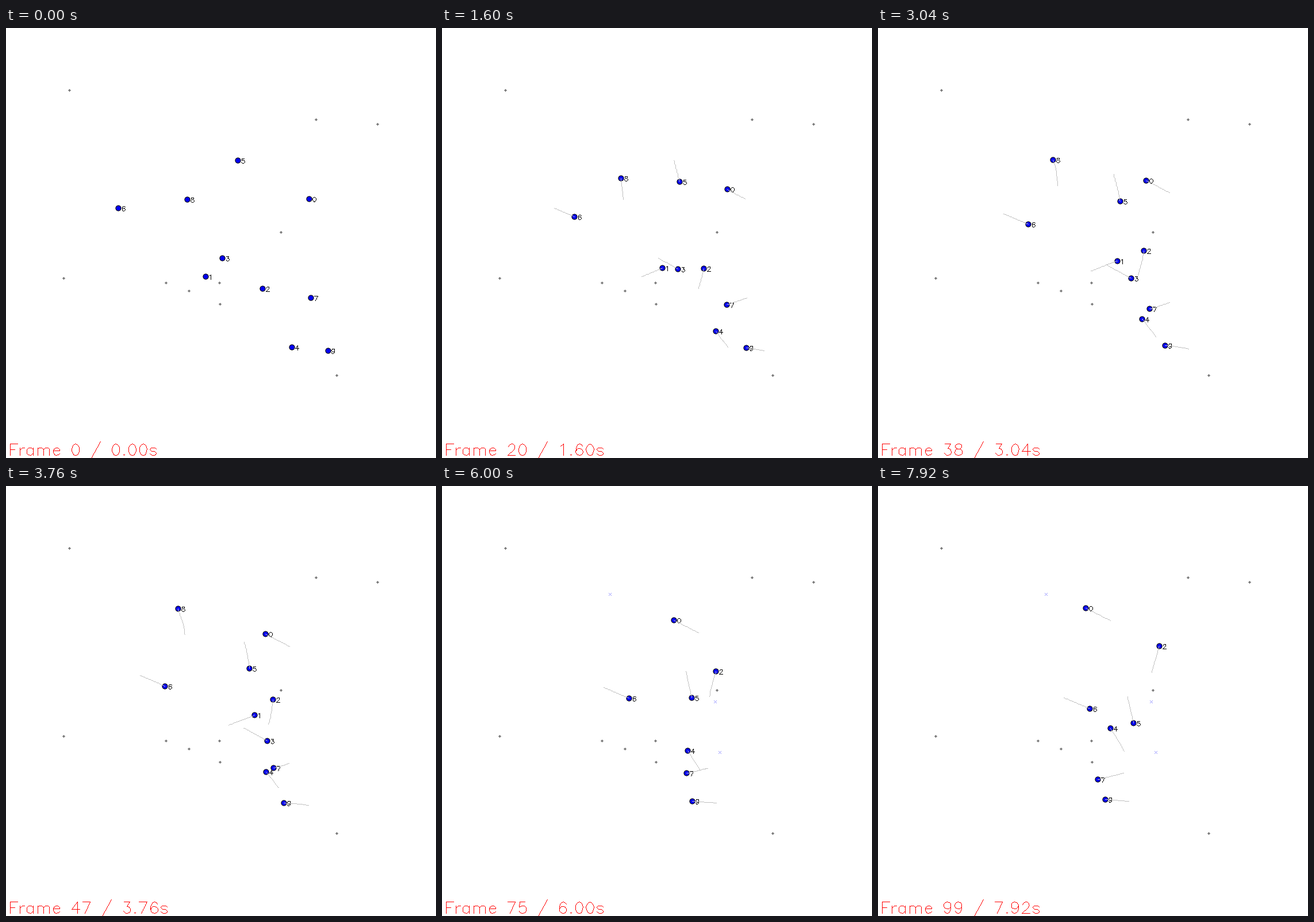
Recreate the animation shown at these times as a matplotlib script. Size 748 by 748 pixels, loop 8 s.

```python
from itertools import pairwise

import numpy as np
import matplotlib.pyplot as plt
from matplotlib.animation import FuncAnimation
from matplotlib.collections import PolyCollection
from matplotlib.patches import Circle

SIZE, DPI = 748, 100
FRAMES, INTERVAL = 100, 80
TRAIL = 25
SPEED, REACH = 1.85, 2.5

OBSTACLES = [(110, 108), (539, 159), (646, 167), (478, 355), (100, 435),
             (278, 443), (371, 443), (318, 457), (372, 480), (575, 604)]

# Each agent walks straight between its positions at these frames
KEYS = (0, 30, 58, 99)
PATHS = [
    [(527, 297), (480, 272), (432, 248), (361, 212)],
    [(347, 432), (401, 410), (452, 391)],
    [(446, 453), (460, 400), (467, 353), (489, 278)],
    [(376, 400), (427, 428), (471, 452)],
    [(497, 555), (465, 513), (444, 487), (404, 421)],
    [(403, 230), (418, 286), (427, 337), (444, 412)],
    [(195, 313), (247, 335), (295, 356), (368, 387)],
    [(530, 469), (478, 487), (456, 492), (382, 510)],
    [(315, 298), (309, 243), (292, 194)],
    [(560, 561), (513, 553), (463, 550), (395, 545)],
]
GOALS = {1: (475, 375), 3: (483, 463), 8: (292, 188)}


def walk(agent):
    """Pixel position at every frame, and the frame at which the agent vanishes."""
    points, times, end = PATHS[agent], KEYS, FRAMES
    if agent in GOALS:
        left = np.hypot(*np.subtract(GOALS[agent], points[-1]))
        points = points + [GOALS[agent]]
        times = KEYS[:3] + (KEYS[2] + left / SPEED,)
        end = round(KEYS[2] + (left - REACH) / SPEED)
    frames = np.arange(FRAMES)
    x, y = (np.interp(frames, times, axis) for axis in zip(*points))
    return np.rint(np.column_stack([x, y])).astype(int), end


def arc(cx, cy, rx, ry, start, end):
    a = np.radians(np.linspace(start, end, max(4, int(abs(end - start) / 20))))
    return list(zip(cx + rx * np.cos(a), cy + ry * np.sin(a)))


# Single-stroke glyphs: advance width and strokes, baseline at 0, capitals 21 high
SIX = arc(11, 10, 7, 11, 40, 170) + arc(10.5, 6.5, 6.5, 6.5, 180, 540)
GLYPHS = {
    "0": (20, [arc(10, 10.5, 7, 10.5, 90, 450)]),
    "1": (20, [[(6, 17), (8, 18), (11, 21), (11, 0)]]),
    "2": (20, [arc(10, 15, 6, 6, 170, -25) + [(13, 10), (3, 0), (17, 0)]]),
    "3": (20, [[(5, 21), (16, 21), (10, 13)] + arc(10.3, 6.5, 6.7, 6.5, 80, -158)]),
    "4": (20, [[(13, 0), (13, 21), (3, 7), (18, 7)]]),
    "5": (20, [[(15, 21), (5, 21), (4, 12)] + arc(10, 7, 7, 7, 120, -155)]),
    "6": (20, [SIX]),
    "7": (20, [[(3, 21), (17, 21), (7, 0)]]),
    "8": (20, [arc(10, 16.5, 6, 4.5, 90, 450), arc(10, 6, 7, 6, 90, 450)]),
    "9": (20, [[(20 - x, 21 - y) for x, y in SIX]]),
    "F": (18, [[(17, 21), (4, 21), (4, 0)], [(4, 11), (12, 11)]]),
    "r": (13, [[(4, 14), (4, 0)], arc(11, 8, 7, 6, 180, 80)]),
    "a": (19, [[(15, 14), (15, 0)], [(15, 11)] + arc(9.3, 7, 6.3, 7, 50, 310) + [(15, 3)]]),
    "m": (30, [[(4, 14), (4, 0)], arc(9.5, 10, 5.5, 4, 180, 0) + [(15, 0)],
               arc(20.5, 10, 5.5, 4, 180, 0) + [(26, 0)]]),
    "e": (18, [[(3, 8), (15, 8)] + arc(9, 7, 6, 7, 8, 320) + [(15, 3)]]),
    "s": (17, [arc(8.5, 10.7, 5.5, 3.3, 10, 255) + arc(8.5, 3.6, 5.5, 3.6, 75, -170)]),
    ".": (10, [[(5, 2), (4, 1), (5, 0), (6, 1), (5, 2)]]),
    "/": (22, [[(20, 25), (2, -7)]]),
    " ": (16, []),
}


def strokes(text, x, y, scale):
    lines, pen = [], 0
    for ch in text:
        width, glyph = GLYPHS[ch]
        lines += [[(x + scale * (pen + px), y - scale * py) for px, py in line]
                  for line in glyph]
        pen += width
    return lines


def squares(cells):
    """Unit squares that cover the given pixels."""
    corners = np.array([(0, 0), (1, 0), (1, 1), (0, 1)])
    return np.array(sorted(cells))[:, None] + corners


def raster(lines):
    """Hard-edged lines, one pixel wide."""
    cells = set()
    for line in lines:
        for a, b in pairwise(np.rint(line).astype(int)):
            steps = max(1, abs(b - a).max())
            cells.update(map(tuple, np.rint(np.linspace(a, b, steps + 1)).astype(int)))
    return squares(cells) if cells else []


fig = plt.figure(figsize=(SIZE / DPI, SIZE / DPI), dpi=DPI, facecolor="white")
ax = fig.add_axes([0, 0, 1, 1])
ax.set_xlim(0, SIZE)
ax.set_ylim(SIZE, 0)
ax.axis("off")


def layer(color, zorder, verts=()):
    return ax.add_collection(PolyCollection(verts, facecolor=color, edgecolor="none",
                                            linewidth=0, zorder=zorder), autolim=False)


diamond = [(i, j) for i in range(-2, 3) for j in range(-2, 3) if abs(i) + abs(j) <= 2]
layer("#808080", 1, squares({(x + i, y + j) for x, y in OBSTACLES for i, j in diamond}))

walks = [walk(i) for i in range(len(PATHS))]
dots = [ax.add_patch(Circle((0, 0), 4.6, fc="#0000f0", ec="black", lw=72 / DPI, zorder=3 + i))
        for i in range(len(PATHS))]
labels = [layer("black", 3.5 + i) for i in range(len(PATHS))]
trails = layer("#c0c0c0", 20)
caption = layer("#ff0000", 21)
crosses = {i: layer("#9696ff", 2, raster([[(x - 2, y - 2), (x + 2, y + 2)],
                                          [(x - 2, y + 2), (x + 2, y - 2)]]))
           for i, (x, y) in GOALS.items()}


def update(n):
    tails = []
    for i, (path, end) in enumerate(walks):
        active = n < end
        dots[i].set_visible(active)
        labels[i].set_visible(active)
        if i in crosses:
            crosses[i].set_visible(not active)
        if active:
            x, y = path[n]
            dots[i].center = (x + 0.5, y + 0.5)
            labels[i].set_verts(raster(strokes(str(i), x + 5, y + 5, 0.4)))
            tails.append(path[max(0, n - TRAIL):n + 1])
    trails.set_verts(raster(tails))
    text = f"Frame {n} / {n * INTERVAL / 1000:.2f}s"
    caption.set_verts(raster(strokes(text, 3.5, 743, 0.946)))
    return [*dots, *labels, trails, caption, *crosses.values()]


anim = FuncAnimation(fig, update, frames=FRAMES, interval=INTERVAL, repeat=True, repeat_delay=0)
plt.show()
```
